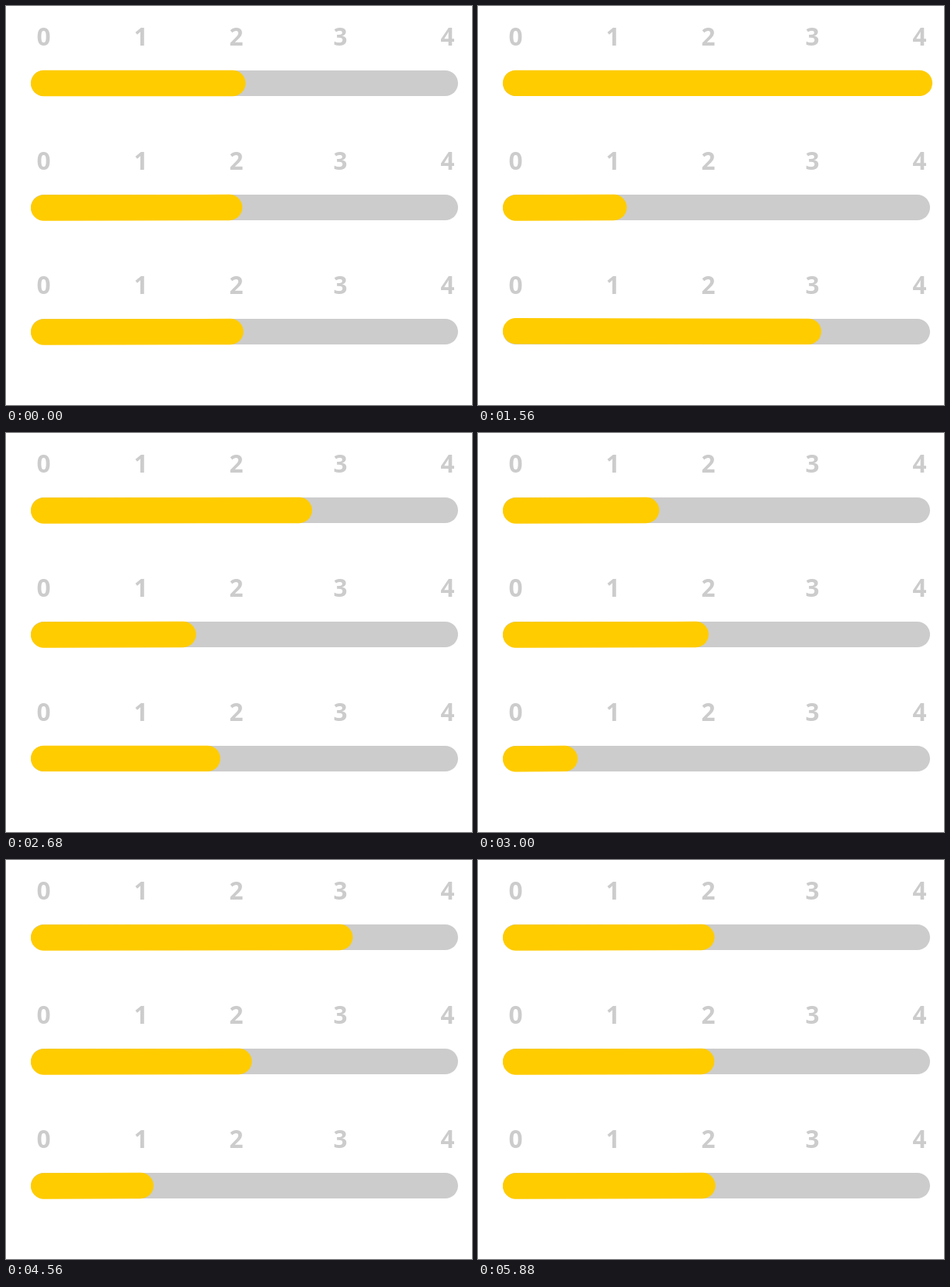
These frames come from a looping animation (600x514 px, 5.92 s). An HTML page:

```html
<!DOCTYPE html>
<html lang="en">
<head>
<meta charset="utf-8">
<title>Sliding bars</title>
<style>
  html, body { margin: 0; width: 100%; height: 100%; overflow: hidden; background: #fff; }
  svg { display: block; width: 600px; height: 514px; }
  text { font: 700 31.5px "Open Sans", "Noto Sans", sans-serif; fill: #ccc; text-anchor: middle; }
  line { stroke-linecap: round; }
</style>
</head>
<body>
<svg id="stage" viewBox="0 0 600 514"></svg>
<script>
const TICK = 40, LOOP = 148, ROW = 160, LEFT = 48.6;
const stage = document.getElementById('stage');
const labelX = [48.5, 173.8, 296.5, 430.5, 568.5];

// Each move runs linearly between two ticks; the bars rest in between.
const moves = [[19, 39], [58, 78], [96, 114], [130, 147]];

// A pose is the right edge plus the vertical offset of the left and right cap.
const flat = x => [x, 0, 0];
const tilt = x => [x, 0.5, 0];
const bars = [
  [[flat(308.5), [585, -0.2, -0.2]], [tilt(575), tilt(173)], [tilt(188), tilt(446.5)], [tilt(449), tilt(304.5)]],
  [[tilt(304.3), tilt(191.6)], [tilt(186), tilt(316.5)], [tilt(316.5), tilt(316.5)], [tilt(316.5), tilt(304.3)]],
  [[tilt(305.7), [442, -0.75, -0.2]], [[442, -0.75, -0.2], tilt(73)], [tilt(76), tilt(190)], [tilt(190), tilt(305.7)]]
];

function add(tag, attrs, text) {
  const el = document.createElementNS('http://www.w3.org/2000/svg', tag);
  for (const name in attrs) el.setAttribute(name, attrs[name]);
  if (text !== undefined) el.textContent = text;
  return stage.appendChild(el);
}

const fills = bars.map((_, row) => {
  const top = row * ROW;
  labelX.forEach((x, n) => add('text', { x, y: top + 50.5 }, n));
  add('rect', { x: 32, y: top + 83, width: 550, height: 33, rx: 16.5, fill: '#ccc' });
  return add('line', { x1: LEFT, stroke: '#fc0', 'stroke-width': 33.3 });
});

function poseAt(bar, tick) {
  let i = 0;
  while (i < moves.length - 1 && tick >= moves[i + 1][0]) i++;
  const [start, end] = moves[i];
  const p = Math.min(1, Math.max(0, (tick - start) / (end - start)));
  const [from, to] = bar[i];
  return from.map((v, n) => v + (to[n] - v) * p);
}

function draw(ms) {
  const tick = Math.floor(ms / TICK) % LOOP;
  bars.forEach((bar, row) => {
    const [right, left, end] = poseAt(bar, tick);
    const mid = row * ROW + 99.5;
    fills[row].setAttribute('x2', right - 16.6);
    fills[row].setAttribute('y1', mid + left);
    fills[row].setAttribute('y2', mid + end);
  });
}

const began = performance.now();
function loop() {
  draw(performance.now() - began);
  requestAnimationFrame(loop);
}
loop();
</script>
</body>
</html>
```
